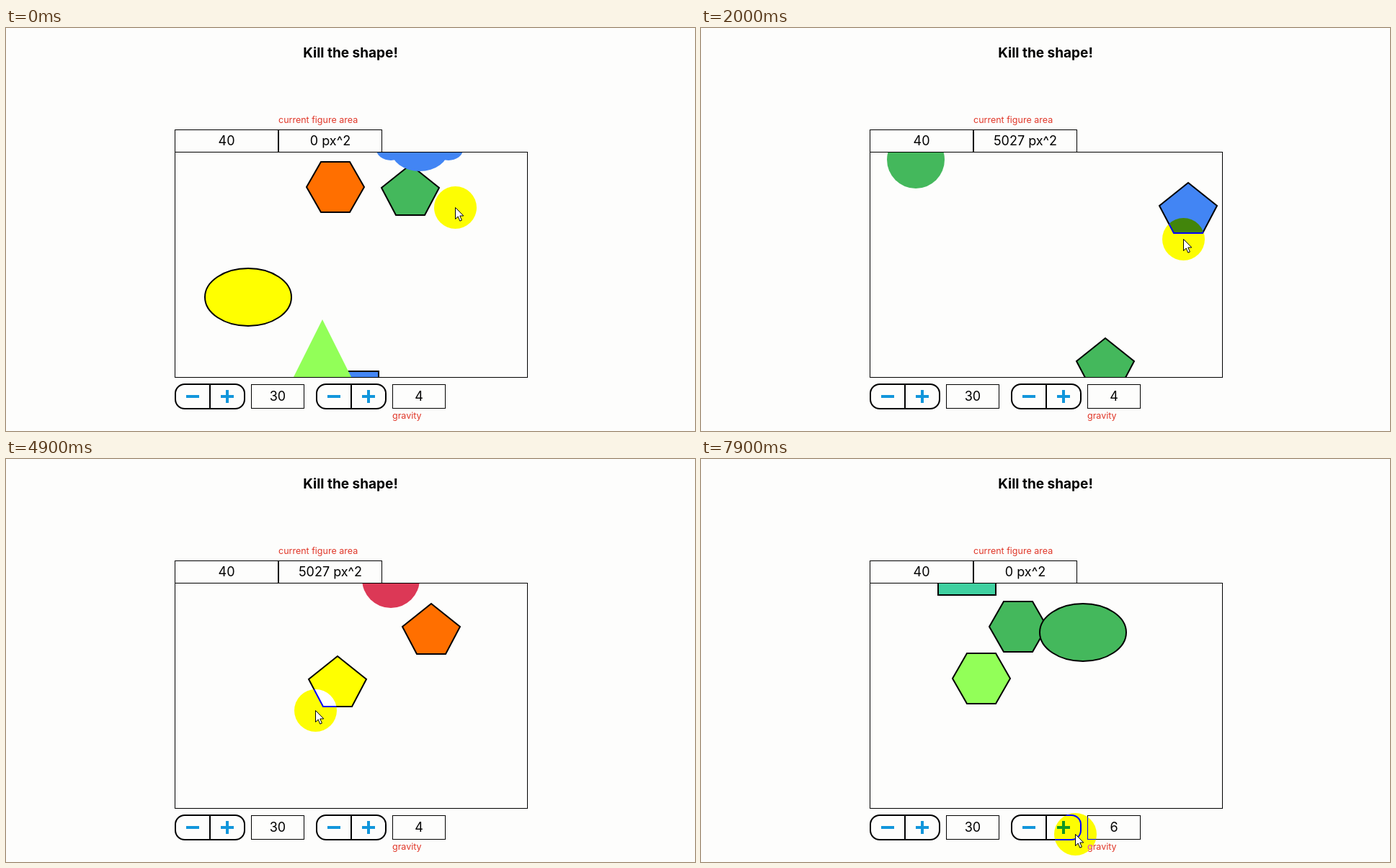
Recreate the animation shown at these times as an HTML page with a canvas. Size 956x560 px, loop 8 s.

```html
<!DOCTYPE html>
<html lang="en">
<head>
<meta charset="utf-8">
<title>Kill the shape!</title>
<style>
html, body { margin: 0; width: 100%; height: 100%; overflow: hidden; background: #fdfdfc; }
body { position: relative; font: 18px/1 Inter, sans-serif; color: #000; }
body > * { position: absolute; box-sizing: border-box; }
h1 { left: 0; top: 25px; width: 956px; margin: 0; font-size: 19px; line-height: 20px; text-align: center; }
.label { color: #e0382a; font-size: 12.5px; line-height: 16px; white-space: nowrap; }
.box { border: 1px solid #000; display: flex; align-items: center; justify-content: center; }
.info { top: 141px; width: 144px; height: 32px; }
.value { top: 495px; width: 74px; height: 34px; }
.arena { left: 234px; top: 172px; width: 490px; height: 314px; }
canvas { left: 235px; top: 173px; }
.stepper { top: 494px; width: 98px; height: 36px; border: 2px solid #000; border-radius: 14px; }
.stepper svg { display: block; }
#glow { left: -29px; top: -29px; width: 59px; height: 59px; border-radius: 50%; background: #00f; mix-blend-mode: difference; }
#cursor { left: 0; top: 0; overflow: visible; }
#cursor path { fill: #fff; stroke: #000; stroke-linejoin: round; }
</style>
</head>
<body>
<h1>Kill the shape!</h1>
<div class="label" style="left:378px;top:120px">current figure area</div>
<div class="box info" style="left:234px">40</div>
<div class="box info" style="left:378px" id="area">0 px^2</div>
<div class="box arena"></div>
<canvas id="stage" width="488" height="312"></canvas>
<div class="stepper" style="left:234px"><svg width="94" height="32"><path d="M47 0V32" stroke="#000" stroke-width="2"/><path d="M14 16H32M62 16H80M71 7V25" stroke="#1296db" stroke-width="4"/></svg></div>
<div class="box value" style="left:340px">30</div>
<div class="stepper" style="left:430px"><svg width="94" height="32"><path d="M47 0V32" stroke="#000" stroke-width="2"/><path d="M14 16H32M62 16H80M71 7V25" stroke="#1296db" stroke-width="4"/></svg></div>
<div class="box value" style="left:536px" id="gravity">4</div>
<div class="label" style="left:536px;top:531px">gravity</div>
<div id="glow"></div>
<svg id="cursor" width="20" height="26">
  <path id="arrow" d="M.5 .5V16.5L4.2 13L6.8 19.2L9.4 18.1L6.8 12H11.8Z"/>
  <path id="hand" d="M.5 2Q2.2 -.5 4 2V8.5Q6 7 7.2 9.2Q9 8 10 10Q12.3 9.5 12.5 12V17L10.5 23.5H2.5L-3.5 15Q-4.5 12.3 -2.2 12.5L.5 15Z"/>
</svg>
<script>
const LOOP = 8000, STEP = 100;
const $ = id => document.getElementById(id);
const ctx = $('stage').getContext('2d');

const ellipses = (...list) => {
  const p = new Path2D();
  for (const [x, y, rx, ry] of list) {
    p.moveTo(x + rx, y);
    p.ellipse(x, y, rx, ry, 0, 0, 2 * Math.PI);
  }
  return p;
};
const both = (x, y, rx, ry) => [[-x, y, rx, ry], [x, y, rx, ry]];

const paths = {
  hex: new Path2D('M-20-35H20L40 0L20 35H-20L-40 0Z'),
  pent: new Path2D('M0-32L40 0L20 38H-20L-40 0Z'),
  rect: new Path2D('M-40-40H40V40H-40Z'),
  tri: new Path2D('M0-40L40 40H-40Z'),
  oval: ellipses([0, 0, 60, 40]),
  circle: ellipses([0, 0, 40, 40]),
  cloud: ellipses([0, -15, 40, 30], [0, 15, 40, 30], ...both(40, -15, 20, 15),
    ...both(40, 15, 20, 15), ...both(50, 0, 25, 15))
};
const outlined = new Set(['hex', 'pent', 'rect', 'oval']);

const green = '#44b85c', blue = '#4285f4', yellow = '#ff0', orange = '#ff6f00', lime = '#92ff58';
// kind, colour, x, y at a known time, that time, time of the kill
const shapes = [
  ['rect', blue, 477, 517, 0],
  ['tri', lime, 439, 445, 0],
  ['oval', yellow, 336, 518.5, 1200],
  ['hex', orange, 457, 221, 0, 600],
  ['pent', green, 561, 366.6, 1200],
  ['cloud', blue, 574, 298, 1200, 1400],
  ['tri', green, 653, 231, 1200, 1700],
  ['pent', blue, 676, 247, 2000, 2200],
  ['circle', green, 298, 183, 2000, 2900],
  ['hex', '#7bc88c', 611, 151, 3600, 4600],
  ['pent', yellow, 460, 149.5, 3600, 5100],
  ['pent', orange, 590, 233, 4900, 5600],
  ['circle', '#dc3856', 534, 167, 4900, 6000],
  ['oval', '#ff45aa', 541, 239, 6100, 6400],
  ['hex', lime, 389, 305, 7900],
  ['hex', green, 440, 233, 7900],
  ['oval', green, 530, 241, 7900],
  ['rect', '#3fd0a0', 369, 149, 7900]
];

// time, x, y of the pointer
const route = [
  [0, 623, 249], [500, 460, 278], [600, 462, 280], [1200, 566, 323], [1300, 566, 323],
  [1600, 655, 295], [2000, 669, 293], [2200, 669, 293], [2800, 300, 285], [2900, 302, 287],
  [3600, 542, 376], [3800, 542, 376], [4400, 611, 272], [4550, 609, 274], [4900, 429, 349],
  [5350, 431, 348], [5550, 588, 330], [5600, 586, 330], [5900, 537, 303], [6400, 537, 303],
  [7000, 505, 514], [7700, 505, 514], [7900, 519, 521], [8000, 519, 521]
];

const gravityAt = t => t < 7500 ? 4 : t < 7700 ? 5 : 6;
// distance fallen since the start, in pixels
const fall = t => 0.0301 * (4 * t + Math.max(0, t - 7500) + Math.max(0, t - 7700));

function pointerAt(t) {
  const i = route.findIndex(p => p[0] > t);
  const [t0, x0, y0] = route[i - 1], [t1, x1, y1] = route[i];
  const k = (t - t0) / (t1 - t0), e = k * k * (3 - 2 * k);
  return [Math.round(x0 + (x1 - x0) * e), Math.round(y0 + (y1 - y0) * e)];
}

function draw(t) {
  const [px, py] = pointerAt(t);
  let hover = false, area = 0;
  ctx.setTransform(1, 0, 0, 1, 0, 0);
  ctx.clearRect(0, 0, 488, 312);
  ctx.lineWidth = 2;
  for (const [kind, color, x, y0, t0, end = Infinity] of shapes) {
    const y = Math.round(y0 + fall(t) - fall(t0));
    if (t >= end || y < 130 || y > 540) continue;
    const path = paths[kind];
    ctx.setTransform(1, 0, 0, 1, 0, 0);
    if (ctx.isPointInPath(path, px - x, py - y)) hover = true;
    if (kind === 'circle') area += Math.round(Math.PI * 1600);
    ctx.translate(x - 235, y - 173);
    ctx.fillStyle = color;
    ctx.fill(path);
    if (outlined.has(kind)) ctx.stroke(path);
  }
  $('area').textContent = area + ' px^2';
  $('gravity').textContent = gravityAt(t);
  $('glow').style.transform = $('cursor').style.transform = `translate(${px}px, ${py}px)`;
  $('arrow').style.display = hover ? 'none' : '';
  $('hand').style.display = hover ? '' : 'none';
}

const start = performance.now();
function tick() {
  const t = (performance.now() - start) % LOOP;
  draw(Math.floor(t / STEP) * STEP);
  requestAnimationFrame(tick);
}
tick();
</script>
</body>
</html>
```
